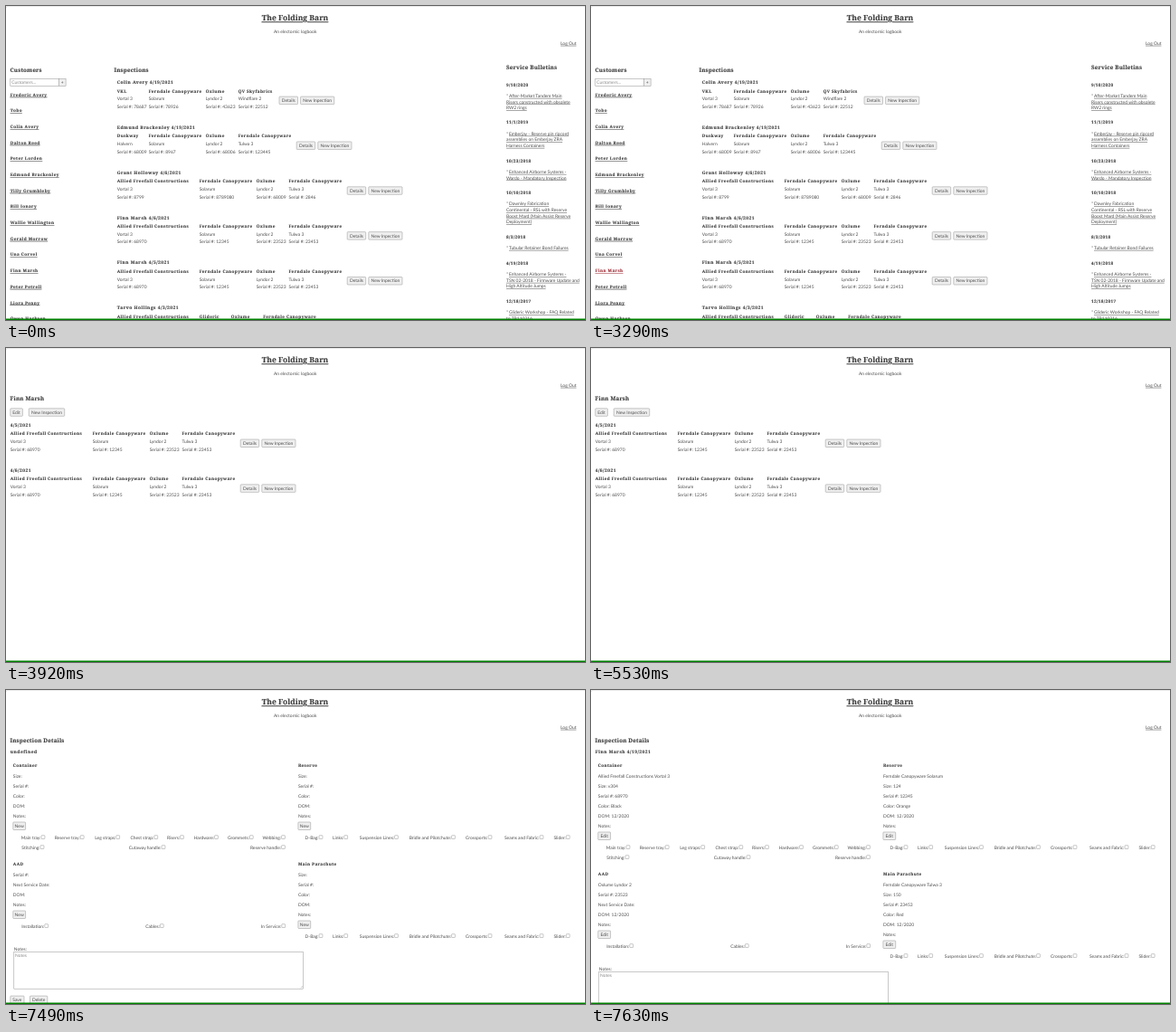
Animation, 640 px wide and 347 px high, one loop 8000 ms. Source, as an HTML page:

```html
<!DOCTYPE html>
<html lang="en">
<head>
<meta charset="utf-8">
<title>Logbook</title>
<style>
  html, body { margin: 0; width: 100%; height: 100%; overflow: hidden; background: #fff; }
  svg { display: block; width: 100vw; height: 100vh; text-rendering: geometricPrecision; }
  text { font: 4.95px Lato, sans-serif; fill: #4c4c4c; white-space: pre; }
  .h1, .h2, .h3, .title {
    font-family: "Noto Serif", serif; font-weight: 700;
    fill: #3c3c3c; stroke: #3c3c3c; stroke-width: .12;
  }
  .h1 { font-size: 8.5px; }
  .h2 { font-size: 6.2px; letter-spacing: .2px; }
  .title { font-size: 4.9px; letter-spacing: .5px; }
  .h3 { font-size: 4.65px; letter-spacing: .4px; }
  .link { text-decoration: underline; text-decoration-thickness: .5px; }
  .hint { fill: #8a8a8a; }
  .mid { text-anchor: middle; }
  .end { text-anchor: end; }
  .box { fill: #fff; stroke: #929292; stroke-width: .5; }
  .button { fill: #efefef; stroke: #929292; stroke-width: .5; }
  .active { fill: #9c2c36; stroke: #9c2c36; }
  .hover { fill: #e5e5e5; }
</style>
</head>
<body>
<svg id="stage" viewBox="0 0 640 347" preserveAspectRatio="none"></svg>
<script>
const LOOP = 8000;
const stage = document.getElementById('stage');
let layer = stage;

function add(tag, attrs, content) {
  const node = document.createElementNS('http://www.w3.org/2000/svg', tag);
  for (const key in attrs) node.setAttribute(key, attrs[key]);
  if (content) node.textContent = content;
  return layer.appendChild(node);
}

const SIZES = { h1: 8.5, h2: 6.2, title: 4.9, h3: 4.65 };

// y is the middle of the capitals
function label(x, y, content, style = '') {
  const size = SIZES[style.split(' ')[0]] || 4.95;
  return add('text', { x, y: y + size * .36, class: style }, content);
}

function rect(x, y, width, height, style, rx = 0) {
  return add('rect', { x, y, width, height, rx, class: style });
}

function button(x, y, width, content) {
  const face = rect(x, y - 4.2, width, 8.5, 'button', .7);
  label(x + width / 2, y, content, 'mid');
  return face;
}

function group(draw) {
  const parent = layer;
  const node = layer = add('g', {});
  draw();
  layer = parent;
  return node;
}

const LOFT = 'Allied Freefall Constructions', CANOPY = 'Ferndale Canopyware', AAD = 'Oxlume';
const OWNER = 'Finn Marsh';
const WIDE = [0, 91, 154, 189.8], NARROW = [0, 35, 98, 134];
const MODELS = ['Vortal 3', 'Solarum', 'Lyndor 2', 'Tulwa 3'];
const ownerRig = date => ({
  title: date, makers: [LOFT, CANOPY, AAD, CANOPY], models: MODELS,
  serials: [68970, 12345, 23523, 23453], columns: WIDE, actions: 254.5
});

const inspections = [
  { title: 'Colin Avery 4/19/2021', makers: ['VKL', CANOPY, AAD, 'QV Skyfabrics'],
    models: ['Vortal 3', 'Solarum', 'Lyndor 2', 'Windflare 2'],
    serials: [78687, 78926, 43623, 22512], columns: NARROW, actions: 179.3 },
  { title: 'Edmund Brackenley 4/19/2021', makers: ['Duskway', CANOPY, AAD, CANOPY],
    models: ['Halvern', 'Solarum', 'Lyndor 2', 'Tulwa 3'],
    serials: [68009, 8967, 68006, 123445], columns: NARROW, actions: 198.5 },
  { ...ownerRig('Grant Holloway 4/6/2021'), serials: [8799, 8789080, 68009, 2846] },
  ownerRig(OWNER + ' 4/6/2021'),
  ownerRig(OWNER + ' 4/5/2021'),
  { title: 'Tarvo Hollings 4/3/2021', makers: [LOFT, 'Glideric', AAD, CANOPY],
    models: MODELS, serials: [68970, 12345, 23523, 23453],
    columns: [0, 91, 126, 161.5], actions: 226 }
];

function inspection(x, y, row) {
  label(x, y, row.title, 'title');
  row.columns.forEach((dx, i) => {
    label(x + dx, y + 9.6, row.makers[i], 'h3');
    label(x + dx, y + 18.1, row.models[i]);
    label(x + dx, y + 26.8, 'Serial #: ' + row.serials[i]);
  });
  button(x + row.actions, y + 20, 20.5, 'Details');
  return button(x + row.actions + 23.6, y + 20, 37.2, 'New Inpection');
}

const customers = ['Frederic Avery', 'Tobo', 'Colin Avery', 'Dalton Reed', 'Peter Lorden',
  'Edmund Brackenley', 'Tilly Grumbleby', 'Bill Ionary', 'Wallie Wallington', 'Gerald Morrow',
  'Una Corvel', OWNER, 'Peter Petrell', 'Liora Penny', 'Owen Harksen'];

const bulletins = [
  [87, '9/10/2020', 'After-Market Tandem Main', 'Risers constructed with obsolete', 'RW2 rings'],
  [128.7, '11/1/2019', 'Emberjay - Reserve pin ripcord', 'assemblies on Emberjay ZRA', 'Harness Containers'],
  [171, '10/23/2018', 'Enhanced Airborne Systems -', 'Wardo - Mandatory Inspection'],
  [206.5, '10/10/2018', 'Dawnley Fabrication', 'Continental - RSL with Reserve', 'Boost Mard (Main Assist Reserve', 'Deployment)'],
  [255, '8/3/2018', 'Tubular Retainer Bond Failures'],
  [284.3, '4/19/2018', 'Enhanced Airborne Systems -', 'TSN 02-2018 - Firmware Update and', 'High Altitude Jumps'],
  [326.3, '12/18/2017', 'Glideric Workshop - FAQ Related', 'to TB110316']
];

let activeName, hoverButton;

const home = group(() => {
  label(4.5, 70.5, 'Customers', 'h2');
  rect(4.8, 80.5, 53.5, 8, 'box');
  label(6.3, 84.5, 'Customers...', 'hint');
  rect(58.3, 80.5, 7.8, 8, 'button');
  label(62.2, 84.3, '+', 'mid');
  customers.forEach((name, i) => {
    const node = label(4.7, 98 + i * 17.68, name, 'h3 link');
    if (name === OWNER) activeName = node;
  });
  label(119.5, 70.5, 'Inspections', 'h2');
  inspections.forEach((row, i) => inspection(122.7, 84.3 + i * 49.85, row));
  label(553, 67.5, 'Service Bulletins', 'h2');
  for (const [y, date, ...lines] of bulletins) {
    label(553, y, date, 'h3');
    lines.forEach((line, i) => {
      const lineY = y + 12.1 + i * 6.65;
      if (!i) label(553, lineY, '*');
      label(i ? 553 : 556, lineY, line, 'link');
    });
  }
});

const profile = group(() => {
  label(4.5, 56, OWNER, 'h2');
  button(4.8, 71, 13.6, 'Edit');
  button(25.2, 71, 39.5, 'New Inspection');
});

const history = group(() => {
  inspection(4.7, 85.2, ownerRig('4/5/2021'));
  hoverButton = inspection(4.7, 135.05, ownerRig('4/6/2021'));
});

// Each check is a name and the centre of its box
const containerChecks = [
  [['Main tray', 41], ['Reserve tray', 84.2], ['Leg straps', 123.7], ['Chest strap', 165.8],
   ['Risers', 194.5], ['Hardware', 232.5], ['Grommets', 271.3], ['Webbing', 306.5]],
  [['Stitching', 40], ['Cutaway handle', 174], ['Reserve handle', 306.5]]
];
const aadChecks = [[['Installation', 44.7], ['Cables', 172.3], ['In Service', 306.7]]];
const canopyChecks = [[['D-Bag', 348], ['Links', 375.7], ['Suspension Lines', 431.5],
  ['Bridle and Pilotchute', 494.5], ['Crossports', 535], ['Seams and Fabric', 592], ['Slider', 621.2]]];

const GEAR = ['Size:', 'Serial #:', 'Color:', 'DOM:', 'Notes:'];
const DEVICE = ['Serial #:', 'Next Service Date:', 'DOM:', 'Notes:'];

function section(x, y, title, names, checks, data) {
  label(x, y, title, 'h3');
  const lines = names.map((name, i) => data ? name + ' ' + (data[i + 1] || '') : name);
  if (data) lines.unshift(data[0]);
  lines.forEach((line, i) => label(x, y + 11.6 + i * 11, line));
  const end = y + 12 + lines.length * 11;
  button(x, end, 13.8, data ? 'Edit' : 'New');
  checks.forEach((row, i) => row.forEach(([name, cx]) => {
    const cy = end + 12.6 + i * 11;
    label(cx - 2.4, cy, name + ':', 'end');
    rect(cx - 1.9, cy - 2.1, 3.8, 3.8, 'box', .5);
  }));
}

function details(subtitle, data) {
  const shift = data.length ? 11 : 0;
  label(4.5, 56, 'Inspection Details', 'h2');
  label(4.7, 68, subtitle, 'title');
  section(7.8, 83.2, 'Container', GEAR, containerChecks, data[0]);
  section(322.9, 83.2, 'Reserve', GEAR, canopyChecks, data[1]);
  section(7.8, 192.2 + shift, 'AAD', DEVICE, aadChecks, data[2]);
  section(322.9, 192.2 + shift, 'Main Parachute', GEAR, canopyChecks, data[3]);
  const y = 285.8 + shift * 2;
  label(8.7, y, 'Notes:');
  rect(8.8, y + 3.7, 319.8, 40.7, 'box');
  label(10, y + 7.7, 'Notes', 'hint');
  add('path', { d: `M325.5 ${y + 43.5}l2.3-2.3m-1 2.3l1-1`, stroke: '#999', 'stroke-width': .4 });
  button(4.8, y + 56.5, 15.2, 'Save');
  button(26.5, y + 56.5, 19.3, 'Delete');
}

const emptyDetails = group(() => details('undefined', []));
const fullDetails = group(() => details(OWNER + ' 4/19/2021', [
  [LOFT + ' Vortal 3', 'v304', '68970', 'Black', '12/2020'],
  [CANOPY + ' Solarum', '124', '12345', 'Orange', '12/2020'],
  [AAD + ' Lyndor 2', '23523', '', '12/2020'],
  [CANOPY + ' Tulwa 3', '150', '23453', 'Red', '12/2020']
]));

label(319.5, 13.2, 'The Folding Barn', 'h1 link mid');
label(319.7, 28.3, 'An electornic logbook', 'mid');
label(613, 41, 'Log Out', 'link');
add('path', { d: 'M0 2Q0 .3 2 .3H640', fill: 'none', stroke: '#d4d4d4', 'stroke-width': .6 });
add('rect', { x: 0, y: 345.5, width: 640, height: 1.5, fill: '#008000' });

function render(time) {
  const t = time % LOOP;
  const show = (node, from, to) =>
    node.setAttribute('visibility', t >= from && t < to ? 'visible' : 'hidden');
  show(home, 0, 3850);
  show(profile, 3850, 7490);
  show(history, 3920, 7490);
  show(emptyDetails, 7490, 7630);
  show(fullDetails, 7630, LOOP);
  activeName.classList.toggle('active', t >= 3290);
  hoverButton.classList.toggle('hover', t >= 7350);
}

let start;
function tick(now) {
  start ??= now;
  render(now - start);
  requestAnimationFrame(tick);
}
render(0);
requestAnimationFrame(tick);
</script>
</body>
</html>
```
